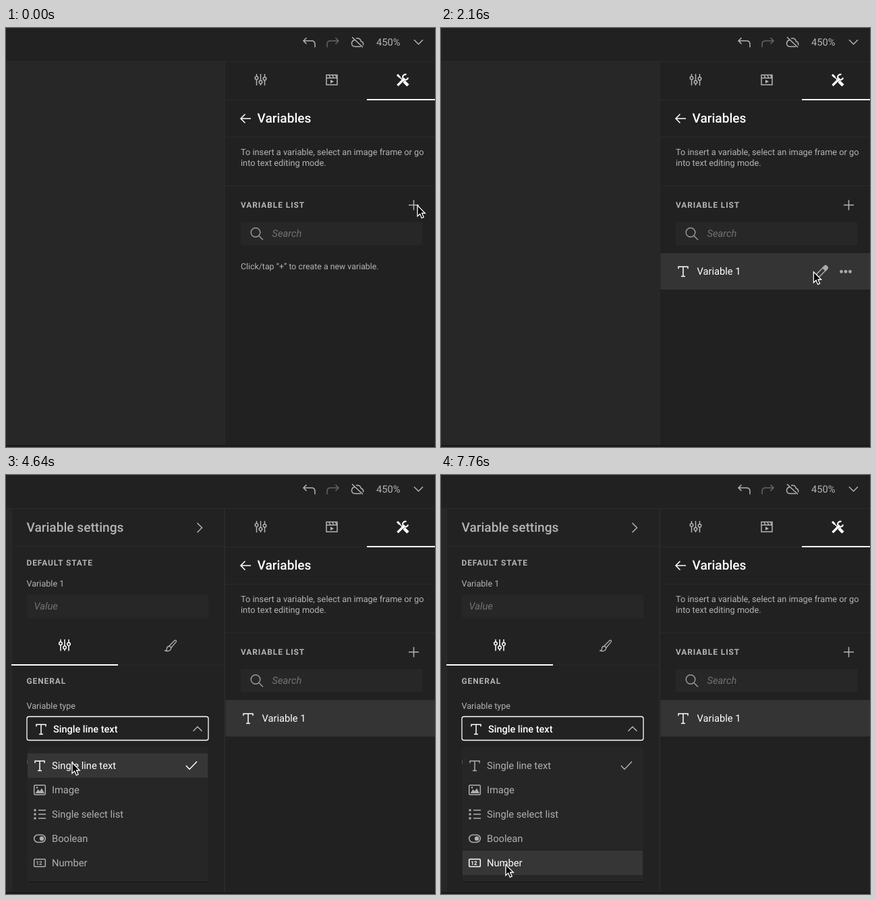
Recreate the animation shown at these times as an HTML page. Size 636 by 620 pixels, loop 8000 ms.

```html
<!DOCTYPE html>
<html lang="en">
<head>
<meta charset="utf-8">
<title>Variable panel</title>
<style>
html, body { margin: 0; width: 100%; height: 100%; overflow: hidden; background: #212121; }
svg { display: block; width: 636px; height: 620px; color: #b4b4b4; }
text { font: 14.7px Roboto, sans-serif; fill: currentColor; text-rendering: geometricPrecision; }
.title { font-size: 19.1px; font-weight: 500; }
.small { font-size: 12.6px; }
.caps { font-size: 11.9px; font-weight: 700; letter-spacing: .95px; }
.hint { font-style: italic; fill: #737373; }
.line { fill: none; stroke: currentColor; stroke-width: 1.5; }
.rule { fill: none; stroke: #2a2a2a; }
.solid { fill: currentColor; }
.field { fill: #272727; }
.white { color: #fff; }
.dim { color: #666; }
</style>
</head>
<body>
<svg viewBox="0 0 636 620">
  <defs>
    <path id="letterT" class="line" d="M1 4.2V1.2H15V4.2M8 1.2V15.4M5 15.4H11"/>
    <g id="sliders" class="line">
      <path d="M-6-8.5V-5M-6 0V8.5M0-8.5V1M0 6V8.5M6-8.5V-4M6 1V8.5"/>
      <circle cx="-6" cy="-2.5" r="2.3"/><circle cy="3.5" r="2.3"/><circle cx="6" cy="-1.5" r="2.3"/>
    </g>
    <path id="undo" class="line" d="M445.500 15L441 19.500L445.500 24M441 19.500H453Q458 19.500 458 24.500V29"/>
  </defs>

  <rect y="50" width="324" height="567" fill="#272727"/>
  <path class="rule" d="M0 49.500H636M324.500 50V617M325 106.500H636M325 161.500H636M325 233.500H636"/>

  <!-- top bar -->
  <g transform="translate(0 -.5)">
    <use href="#undo"/>
    <use href="#undo" class="dim" transform="matrix(-1 0 0 1 934 0)"/>
    <path class="line" d="M513 14L529 29M517.500 18Q512.500 19 512.500 23.500Q513 28 517 28H526M519 16Q525 14.500 526.500 20.500Q530.500 21.500 529.500 26"/>
    <text x="549" y="26.800">450%</text>
    <path class="line" d="M605 18L611.500 24.500L618 18"/>
  </g>

  <!-- tabs -->
  <use href="#sliders" x="377.500" y="76.500"/>
  <path class="line" d="M475 69.500H491V84H475ZM475 74H491M479 70L481 74M484 70L486 74M488.500 70L490.500 74"/>
  <path class="solid" d="M481 76.500V82L486 79.200Z"/>
  <g class="line white">
    <path style="stroke-width:3" d="M580 69L584 73"/>
    <path d="M583 72L590 79"/>
    <path style="stroke-width:4.500" d="M590 79L596 85"/>
    <path style="stroke-width:3.200" d="M580.500 85L591 74.500"/>
    <path style="stroke-width:2.200" d="M593.500 69A4 4 0 1 0 596 73.500"/>
  </g>
  <rect x="535" y="105" width="101" height="2" fill="#fff"/>

  <!-- variable list -->
  <path class="line white" d="M363 134H348M354.500 127.500L348 134L354.500 140.500"/>
  <text class="title white" x="372.500" y="140.400">Variables</text>
  <text class="small" style="font-size:12.750px" x="348" y="188.300">To insert a variable, select an image frame or go</text>
  <text class="small" style="font-size:12.750px" x="348" y="203.500">into text editing mode.</text>
  <text class="caps" x="348" y="265.600">VARIABLE LIST</text>
  <path class="line" d="M597 262H612M604.500 254.500V269.500"/>
  <rect class="field" x="348" y="287" width="269.500" height="34.500" rx="2"/>
  <g id="search" class="line"><circle cx="370" cy="302.500" r="6.800"/><path d="M375 307.500L381 313.500"/></g>
  <text class="hint" x="394.500" y="308.600">Search</text>
  <text id="empty" class="small" style="font-size:12.350px" x="348" y="356.500">Click/tap “+” to create a new variable.</text>
  <g id="row" class="white">
    <rect x="325.500" y="333" width="311" height="54" fill="#343434"/>
    <use href="#letterT" x="351" y="352"/>
    <text x="379.500" y="365">Variable 1</text>
    <g id="actions">
      <g id="pencil" class="line">
        <path d="M556.500 368L557.500 363.500L568 353Q569.500 351.500 571 353L572 354Q573.500 355.500 572 357L561.500 367.500Z"/>
        <path class="solid" d="M566 355L570 359L573 356Q574 354 572.500 353L571 351.700Q569.500 351 568.500 352.500Z"/>
      </g>
      <g fill="#aaa"><circle cx="593.500" cy="360.500" r="2.400"/><circle cx="600" cy="360.500" r="2.400"/><circle cx="606.500" cy="360.500" r="2.400"/></g>
    </g>
  </g>

  <!-- settings -->
  <g id="settings">
    <rect x="8" y="50" width="316" height="567" fill="#222"/>
    <path class="rule" d="M8.500 50V617M8 105.500H324M166 281.500H324M323.500 50V617"/>
    <text class="title" x="30.500" y="84.200">Variable settings</text>
    <path class="line" d="M283.500 71L290.500 78L283.500 85"/>
    <text class="caps" x="30.500" y="133.600">DEFAULT STATE</text>
    <text class="small" x="30.500" y="165.300">Variable 1</text>
    <rect class="field" x="31" y="177" width="269.500" height="35" rx="3"/>
    <text class="hint" x="41.500" y="199.200">Value</text>
    <use href="#sliders" class="white" x="87" y="251.700"/>
    <path class="line" style="stroke-width:1.300" d="M242 253L250 244.800Q253 243.500 252.300 246.800L245 255.500ZM242 253.500Q238.500 253.500 238.500 257Q238.500 259.500 236.500 260Q243.500 262 245 256"/>
    <rect x="8" y="280" width="158" height="2" fill="#fff"/>
    <text class="caps" x="30.500" y="308.600">GENERAL</text>
    <text class="small" x="30.500" y="346">Variable type</text>
    <rect id="select" x="31" y="357.500" width="269" height="35" rx="3" stroke-width="1.300"/>
    <g class="white">
      <use href="#letterT" x="44" y="368"/>
      <text x="70" y="381" style="font-size:14.500px;font-weight:500">Single line text</text>
    </g>
    <path id="chevron" class="line" d="M277.500 373L284 379.500L290.500 373"/>
    <rect x="31" y="416.500" width="29" height="16" rx="8" fill="#4fc3ae"/>
    <circle cx="52" cy="424.500" r="5.700" fill="#fff"/>
    <text x="71" y="429.300">Visible</text>
    <g id="menu">
      <rect x="31.500" y="403" width="268.500" height="199" rx="2" fill="#262626"/>
      <path d="M35 602H299" stroke="#191919" stroke-width="1.500"/>
    </g>
  </g>

  <rect y="617" width="636" height="3" fill="#1e191b"/>

  <g id="cursor">
    <path id="arrow" fill="#000" stroke="#fff" stroke-width="1.300" d="M1 1.500V17.500L4.700 14L7.300 20.200L10.200 19L7.600 13H12.300Z"/>
    <path id="hand" fill="#000" stroke="#fff" d="M-2 1.500Q0-.5 1.500 1.500L2.500 6.500Q4.500 5 5.500 7Q7.500 5.800 8.300 7.800Q10.500 7.300 11 9.500V13L9.500 15V18H1V16L-4.500 10.500Q-5 8-2.500 9L-.5 11ZM3 12V15M5.300 12V15M7.600 12V15"/>
  </g>
</svg>
<script>
const LOOP = 8000, STEP = 80;
const $ = id => document.getElementById(id);
const show = (id, on) => $(id).style.display = on ? '' : 'none';
const tint = (node, color) => node.style.color = color;

const options = [
  ['Single line text', '<use href="#letterT" x="42" y="-8"/><path class="line" d="M267 0L272 5.500L283-6"/>'],
  ['Image', '<rect class="line" x="41.700" y="-7" width="16.600" height="14" rx="1.500"/><path class="solid" d="M43.500 5L47.500-1L50 2L53-2.500L57 5Z"/><circle class="solid" cx="46" cy="-3.500" r="1.300"/>'],
  ['Single select list', '<path class="line" d="M48-6H59M48 0H59M48 6H59"/><path class="solid" d="M41.500-7.500h3v3h-3zM41.500-1.500h3v3h-3zM41.500 4.500h3v3h-3z"/>'],
  ['Boolean', '<rect class="line" x="41.700" y="-5.500" width="16.600" height="11" rx="5.500"/><circle class="solid" cx="53" r="3.200"/>'],
  ['Number', '<rect class="line" x="41.700" y="-5.500" width="16.600" height="11" rx="1"/><text x="44.300" y="3" style="font-size:8px;font-weight:700">12</text>']
];
$('menu').innerHTML += options.map(([label, icon], i) =>
  `<g class="option" transform="translate(0 ${430 + 36 * i})">
    <rect x="32" y="-18" width="267" height="36"/>${icon}<text x="68" y="5">${label}</text></g>`).join('');
const rows = [...document.querySelectorAll('.option')];
const hoverTimes = [4640, 5200, 5920, 6400, 7120];

// Pointer stops: time, x, y
const stops = [
  [0, 609, 261], [200, 609, 261], [720, 604, 263], [1160, 604, 263], [1520, 515.5, 329.5],
  [2000, 541, 356], [2480, 566.5, 362.5], [2900, 566.5, 362.5], [3480, 120, 380], [3840, 99, 378],
  [4440, 99, 378], [4640, 97, 424], [4800, 97, 434], [5000, 97, 434], [5440, 99, 473],
  [5720, 99, 473], [5840, 99, 488], [6000, 99, 503], [6200, 99, 503], [6560, 91, 542],
  [6640, 91, 542], [6720, 91, 543], [6920, 91, 543], [7360, 96, 595], [7760, 95, 575], [8000, 95, 575]
];

const slope = (i, axis) => i >= 0 && stops[i + 1]
  ? (stops[i + 1][axis] - stops[i][axis]) / (stops[i + 1][0] - stops[i][0]) : 0;

// Smooth through-speed at a stop, zero where the pointer rests or turns
function tangent(i, axis) {
  const a = slope(i - 1, axis), b = slope(i, axis);
  return a * b > 0 ? 2 * a * b / (a + b) : 0;
}

function pointer(t, axis) {
  const i = stops.findLastIndex(s => s[0] <= t), from = stops[i], to = stops[i + 1];
  const d = to[0] - from[0], u = (t - from[0]) / d, v = 1 - u;
  return from[axis] * v * v * (1 + 2 * u) + to[axis] * u * u * (3 - 2 * u)
    + d * u * v * (v * tangent(i, axis) - u * tangent(i + 1, axis));
}

function draw(t) {
  const between = (a, b) => t >= a && t < b;
  const open = t >= 3600, onPencil = between(2320, 2960);
  show('empty', t < 960);
  show('row', t >= 960);
  show('actions', between(1600, 3040));
  show('settings', t >= 2640);
  show('menu', open);
  show('hand', onPencil);
  show('arrow', !onPencil);
  tint($('search'), between(1360, 1600) ? '#fff' : '#999');
  tint($('pencil'), onPencil ? '#fff' : '#aaa');
  $('select').setAttribute('fill', open ? '#222' : '#262626');
  $('select').setAttribute('stroke', open ? '#fff' : 'none');
  $('chevron').setAttribute('transform', open ? 'matrix(1 0 0 -1 0 752)' : '');
  const hovered = hoverTimes.findLastIndex(h => t >= h);
  rows.forEach((row, i) => {
    tint(row, i === hovered ? '#fff' : '#b0b0b0');
    row.firstElementChild.setAttribute('fill', i === hovered ? '#363636' : 'none');
  });
  $('cursor').setAttribute('transform', `translate(${pointer(t, 1)} ${pointer(t, 2)})`);
}

function tick() {
  draw(Math.floor(performance.now() % LOOP / STEP) * STEP);
  requestAnimationFrame(tick);
}
tick();
</script>
</body>
</html>
```
